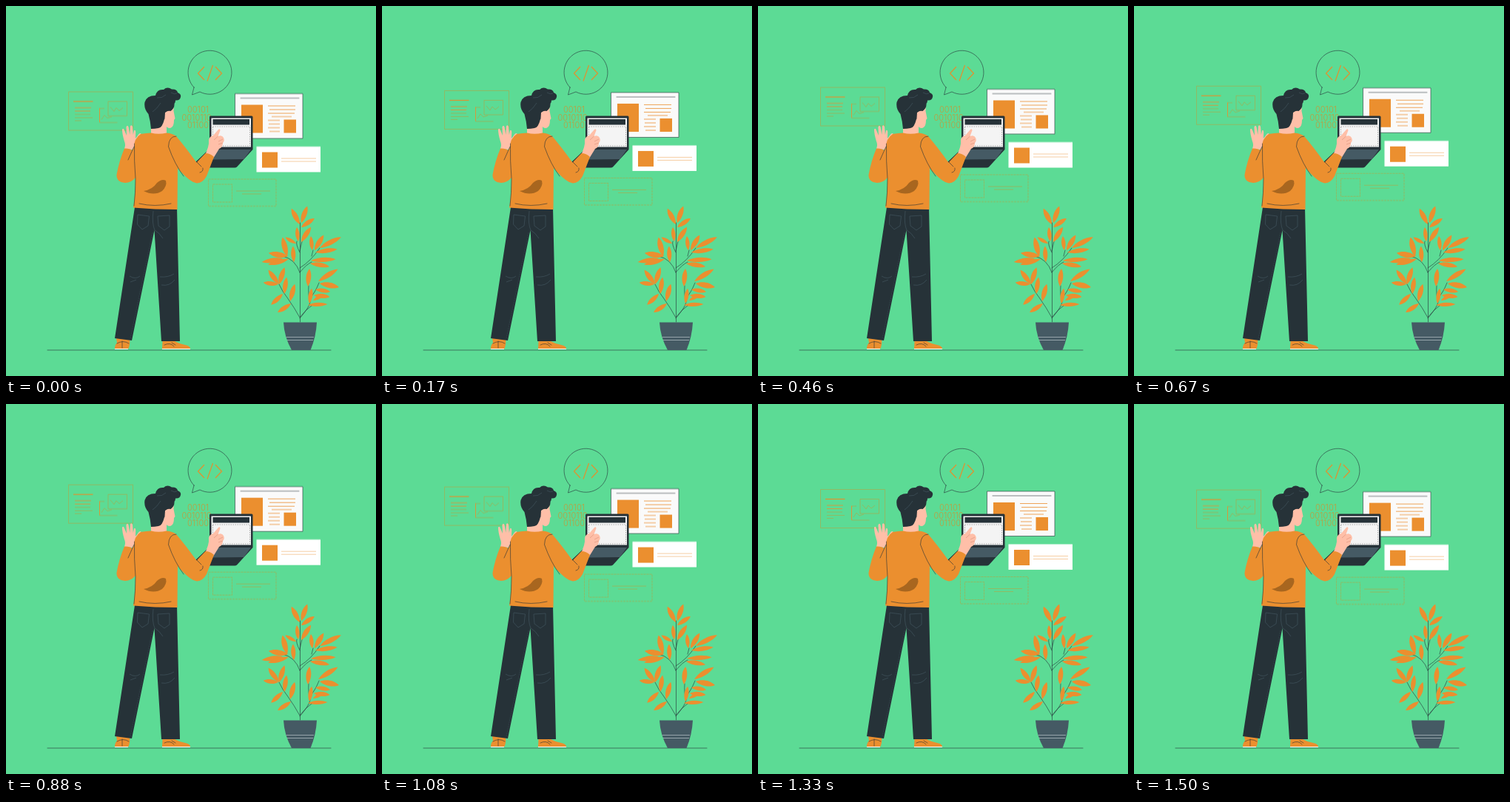
An HTML page without scripts that plays this animation: 500 by 500 pixels, repeating every 1540 ms.

```html
<!DOCTYPE html>
<html lang="en">
<head>
<meta charset="utf-8">
<title>Developer at work</title>
<style>
html, body { margin: 0; width: 100%; height: 100%; overflow: hidden; background: #5cdb95; }
svg { display: block; width: 100vw; height: 100vh; }
.orange { fill: #eb8f2f; }
.dark { fill: #263238; }
.slate { fill: #455a64; }
.skin { fill: #ffbfa8; }
.white { fill: #fafafa; }
.line { fill: none; stroke: #263238; stroke-width: .6; stroke-linecap: round; }
.seam { fill: none; stroke: #455a64; stroke-width: .6; }
.thin { fill: none; stroke: #eb8f2f; stroke-width: .8; }
.bold { fill: none; stroke: #e0922f; stroke-width: 1.2; }
.faint { fill: none; stroke: #a5ae4f; stroke-width: .7; }
.bits { font: 300 11px Inter, sans-serif; fill: #c09c3c; }
.float { animation: float 770ms cubic-bezier(.37, 0, .63, 1) -65ms infinite alternate; }
@keyframes float {
  from { transform: translateY(-.4px); }
  to { transform: translateY(-8.3px); }
}
</style>
</head>
<body>
<svg viewBox="0 0 500 500">
  <defs><path id="leaf" d="M0 0C6-4 16-5.500 24 0C17 4.500 7 4 0 0Z"/></defs>

  <path class="line" d="M56 465H439"/>

  <!-- speech bubble -->
  <path class="line" d="M254 110L251.500 120L262 116A29.500 29.500 0 1 0 254 110Z"/>
  <path class="bold" d="M268 82L259.500 91L268 100M279.500 80L272 101.500M283 82L291.500 91L283 100"/>

  <g class="bits">
    <text x="245" y="144.300">00101</text>
    <text x="237.500" y="154.700">0010110</text>
    <text x="245" y="165">01100</text>
  </g>

  <!-- floating panels -->
  <g class="float">
    <path class="faint" d="M84.500 116.500H171.500V168.500H84.500ZM138 129.500H163.500V149H138Z"/>
    <path class="bold" d="M91 129.500H117.500"/>
    <path class="thin" d="M93 138H115M93 142.500H114"/>
    <path class="faint" d="M93 147H114M93 151.500H117M93 155.500H102"/>
    <path class="faint" d="M141 137L146 143L149 138L153 142L158 138"/>
    <path class="faint" d="M126.500 139V158H150.500M126.500 139H133M129 154L133 148L137 152L143 150"/>
    <path class="thin" d="M126.500 138.500V157.500"/>
  </g>
  <g class="float">
    <path class="faint" stroke-dasharray="3 1" d="M273.500 234.500H365V271H273.500ZM279.500 241.500H305.500V265.500H279.500Z"/>
    <path class="faint" d="M311 250.500H357M319 254.500H345"/>
  </g>
  <g class="float">
    <path class="white" stroke="#263238" stroke-width=".6" d="M309.500 119H401V179.500H309.500Z"/>
    <path class="line" d="M317 125H396"/>
    <path class="orange" d="M318 134H347V172H318ZM375.500 154H392V172H375.500Z"/>
    <path class="thin" d="M354 135.500H391M356 140.500H391M354 145.500H390M359 150H386M354 155H370M355 160H370M354 165H370M356 170H370"/>
  </g>
  <g class="float">
    <path fill="#fff" d="M338.500 190.500H425V225H338.500Z"/>
    <path class="orange" d="M346 198H367V219H346Z"/>
    <path class="thin" stroke-opacity=".55" d="M372 206.500H419M372 210.500H419"/>
  </g>

  <!-- laptop -->
  <path class="dark" d="M276.500 148.500H332Q333.500 148.500 333.500 150V194L312 217.500Q311 218.500 309 218.500H272L256 211L275 193V150Q275 148.500 276.500 148.500Z"/>
  <path class="slate" d="M284 194H331L321.500 207L278 207.500Z"/>
  <path class="line" stroke-opacity=".6" d="M275 192H333"/>
  <path fill="#f4f4f4" d="M277.500 151.500H331V190.500H277.500Z"/>
  <path class="dark" d="M279.500 153H329V160.500H279.500Z"/>
  <path fill="none" stroke="#777" stroke-width=".6" stroke-dasharray="1.500 1.500" d="M279.500 163H329.500V189H279.500Z"/>

  <!-- shoes and trousers -->
  <path class="orange" d="M149 449H167Q168 457 165.500 463H147Q147 458 150 455Z"/>
  <path class="orange" d="M211.500 453H228Q235 457 244 458.500Q249 460 249 463H211Z"/>
  <path fill="none" stroke="#fff" d="M147 463.500H165M211 463.500H249"/>
  <path class="line" d="M150 456Q158 451 166 456M157 453V462M224 455L229 458M214 458Q222 454 227 460"/>
  <path class="dark" d="M174 272H231L235 453H210L200.500 303L170 452L147 449Z"/>
  <path class="seam" d="M178 282L177.500 295L184 302L192 297L193.500 284ZM205 284L206 297L214 303L221 298V283ZM199 277Q197 294 201 303Q207 306 212 314M167 365Q175 370 181 365M168 373L176 370M208 366Q219 367 227 362M210 377Q221 379 228 370"/>
  <path class="seam" stroke-dasharray="2 1" stroke-opacity=".5" d="M198 306L168 449"/>

  <!-- raised left hand -->
  <path class="skin" d="M160 193Q162 187 160 183Q157 173 157 167Q158.500 164 160 168L163 175L162.500 163.500Q164 160 165.500 163.500L167.300 174L168 162.500Q169.500 160 171 163L171.800 174L173 168.500Q174.500 166.500 175.200 170L175 179L180 172.500Q183 171 182.500 174Q177 184 171 194Z"/>

  <!-- head -->
  <path class="skin" d="M196 173V156L217 130L225.500 127Q227 136 226.500 142L228.500 152L227 154Q227 163 223 164.500Q219 166 217 163V173Q206 176 196 173Z"/>
  <path class="dark" d="M196 166Q195 155 192.500 146Q186 139 187.500 130Q190 121 202 121Q204 112 213 113Q218 108.500 224 112.500Q231 112 232 117Q237 119 236 123Q235 128 229 127.500Q229 131 227.500 132Q228 138 222.500 142Q217 141 215.500 145Q217 151 214 153Q211 165 206 165Q201 166 196 166Z"/>
  <path class="skin" d="M215 144Q220 141 220 147Q219 153 214.500 152Z"/>
  <path class="seam" d="M204 124Q211 125 216 120M198 143Q204 139 209 131M223 117Q228 120 231 118"/>

  <!-- pointing hand -->
  <path class="skin" d="M268 203Q275 190 274 181Q275 176 280 175L286.500 167.500Q289 165 289.500 168L286.500 176Q292 174 294 178Q296 182 293 185Q293 191 288 193L280 206Z"/>
  <path fill="none" stroke="#d98f78" stroke-width=".6" d="M286.500 176L281 181M293 180L287 183M293 185L287 187"/>

  <!-- sweater -->
  <path class="orange" d="M182 173Q190 171.500 196 171.500Q206 174 217 171.500Q225 172 230 176Q242 190 257.500 211.500L269.500 199Q276 199 281 204L271 230Q266 239 258 239.500Q248 238 232 219L231.500 275Q201 275 172 272.500Q175 254 175 232Q169 239 161 239Q149 238 149.500 228Q153 209 160 192.500Q167 192 170.500 195L173 191Q173 179 182 173Z"/>
  <path class="line" d="M173.500 186Q173 210 175 233Q175 253 173 270M173 190L165 208M230 176Q220 176 219.500 190Q228 214 240 230M258 211L264 217M266 219Q267 224 262 225M180 267Q201 272 223 267"/>
  <path fill="#a8661f" d="M186 250Q198 248 204 239Q211 233 216 236Q218 243 211 250Q200 257 186 250Z"/>

  <!-- plant -->
  <path class="line" d="M397.500 427V293M397 333Q391 321 393 318M397 331L400 318M397 360Q391 342 374 338M397 360Q406 349 413 346M397 354Q412 345 424 327M413 338L415 330M397 421Q390 408 380 394Q374 387 369 376M397 422Q410 407 411 400Q408 390 409 378M398 420Q405 410 416 403M410 396Q418 387 423 374"/>
  <g class="orange">
    <use href="#leaf" transform="translate(397 295)rotate(-118)"/>
    <use href="#leaf" transform="translate(399 293)rotate(-70)"/>
    <use href="#leaf" transform="translate(399 299)rotate(-34)scale(.9)"/>
    <use href="#leaf" transform="translate(395 318)rotate(-96)scale(.8)"/>
    <use href="#leaf" transform="translate(392 321)rotate(-150)scale(.7)"/>
    <use href="#leaf" transform="translate(399 319)rotate(-57)"/>
    <use href="#leaf" transform="translate(380 338)rotate(-104)scale(1.1)"/>
    <use href="#leaf" transform="translate(389 346)rotate(-93)scale(.9)"/>
    <use href="#leaf" transform="translate(381 338)rotate(-171)scale(1.1)"/>
    <use href="#leaf" transform="translate(374 341)rotate(170)scale(1.2 .9)"/>
    <use href="#leaf" transform="translate(382 342)rotate(165)scale(1.2 .9)"/>
    <use href="#leaf" transform="translate(414 330)rotate(-96)scale(.8)"/>
    <use href="#leaf" transform="translate(417 330)rotate(-59)"/>
    <use href="#leaf" transform="translate(424 327)rotate(-27)scale(1.35 1)"/>
    <use href="#leaf" transform="translate(418 333)rotate(-8)scale(1.25 .9)"/>
    <use href="#leaf" transform="translate(412 344)rotate(-3)scale(1.4 .9)"/>
    <use href="#leaf" transform="translate(411 348)rotate(9)scale(1.1 .9)"/>
    <use href="#leaf" transform="translate(369 376)rotate(-127)"/>
    <use href="#leaf" transform="translate(369 376)rotate(-72)"/>
    <use href="#leaf" transform="translate(368 376)rotate(-174)scale(.85)"/>
    <use href="#leaf" transform="translate(376 389)rotate(-82)scale(.95)"/>
    <use href="#leaf" transform="translate(384 399)rotate(-75)"/>
    <use href="#leaf" transform="translate(374 389)rotate(137)scale(.9)"/>
    <use href="#leaf" transform="translate(385 402)rotate(146)scale(.9)"/>
    <use href="#leaf" transform="translate(408 379)rotate(-85)"/>
    <use href="#leaf" transform="translate(422 372)rotate(-32)scale(1.3 1)"/>
    <use href="#leaf" transform="translate(424 375)rotate(11)scale(1.1)"/>
    <use href="#leaf" transform="translate(418 383)rotate(9)scale(.85)"/>
    <use href="#leaf" transform="translate(416 391)rotate(5)scale(.9)"/>
    <use href="#leaf" transform="translate(410 402)rotate(-81)scale(.85)"/>
    <use href="#leaf" transform="translate(415 398)rotate(-28)scale(.7)"/>
    <use href="#leaf" transform="translate(408 404)rotate(-2)scale(1.1 .8)"/>
  </g>
  <path class="slate" d="M375 427.500H420Q419 447 411.500 465H386Q376 447 375 427.500Z"/>
  <path fill="none" stroke="#b8c4c9" stroke-width=".7" d="M378.500 447.500H416M380 451.500H415"/>
</svg>
</body>
</html>
```
